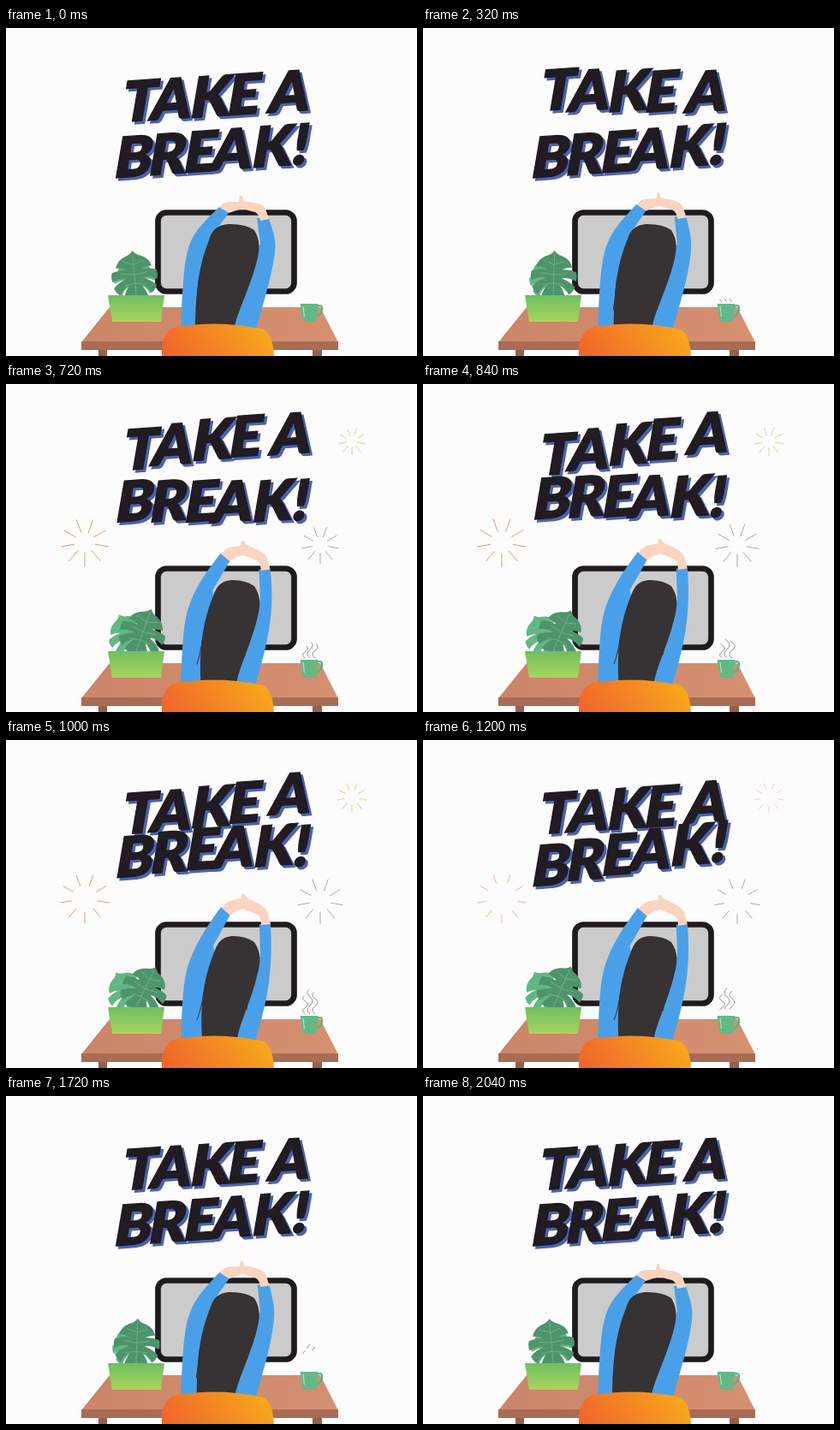
Recreate the animation shown at these times as an HTML page. Size 480 by 383 pixels, loop 2440 ms.

```html
<!DOCTYPE html>
<html lang="en">
<head>
<meta charset="utf-8">
<title>Take a break</title>
<style>
  html, body { margin: 0; width: 100%; height: 100%; overflow: hidden; background: #fcfcfc; }
  svg { display: block; width: 100%; height: 100%; }
  text { font: 900 66px Lato, Inter, sans-serif; text-anchor: middle; stroke-width: 1.4; }
  .shade { fill: #4b62b3; stroke: #4b62b3; }
  .face { fill: #211b22; stroke: #211b22; }
</style>
</head>
<body>
<svg viewBox="0 0 480 383">
  <defs>
    <linearGradient id="potFill" x2="0" y2="1">
      <stop stop-color="#70be62"/><stop offset="1" stop-color="#a8d55c"/>
    </linearGradient>
    <linearGradient id="chairFill" y1=".6" y2=".4">
      <stop stop-color="#f0672b"/><stop offset="1" stop-color="#f8a91a"/>
    </linearGradient>
    <linearGradient id="deskFill">
      <stop stop-color="#cb8568"/><stop offset="1" stop-color="#d59072"/>
    </linearGradient>
    <path id="halfLeaf" d="M0-52Q4-47 9-46Q19-42 21-33Q14-33 9-30Q18-31 26-28Q28-22 26-17Q17-22 9-20Q20-16 25-10Q23-4 18-1Q14-10 7-12Q12-6 14 2Q6 4-.3 0V-52Z"/>
    <g id="leaf">
      <use href="#halfLeaf"/>
      <use href="#halfLeaf" transform="scale(-1 1)"/>
      <path d="M0-48V2M0-36L12-40M0-36L-12-40M0-24L15-26M0-24L-15-26M0-14L13-12M0-14L-13-12" fill="none" stroke="#79b892" stroke-width=".7"/>
    </g>
  </defs>

  <g id="title"></g>
  <g id="bursts" fill="none" stroke-width=".95"></g>

  <rect x="177.5" y="215.5" width="159" height="92" rx="10" fill="#cbcbcc" stroke="#1f1b1d" stroke-width="6.700"/>

  <path d="M108 375h10v8h-10zM358 375h11v8h-11z" fill="#96604c"/>
  <path d="M121 326H367L388 367H88Z" fill="url(#deskFill)"/>
  <path d="M88 366H388V376H88Z" fill="#aa6b54"/>

  <use id="backLeaf" href="#leaf" fill="#61b782"/>
  <use id="frontLeaf" href="#leaf" fill="#4e946b"/>
  <path d="M119 312H185L181 343H124Z" fill="url(#potFill)"/>

  <g id="steam" fill="none" stroke="#939393" stroke-width="1"></g>
  <path d="M363 325Q370 322 369 329Q368 336 361 337" fill="none" stroke="#5cb184" stroke-width="2.4"/>
  <path d="M343.500 322H364.500L362 343H347Z" fill="#62b987"/>
  <path d="M347 325L348.500 337" stroke="#b4dfc5" stroke-width="1.200"/>

  <g id="woman"></g>
  <path d="M182 383C181 366 186 352 199 349Q247 341 298 351C308 354 312 366 313 383Z" fill="url(#chairFill)"/>
</svg>
<script>
const MOVE = 2040, LOOP = 2440, STEP = 40;
const byId = id => document.getElementById(id);
const clamp = v => Math.max(0, Math.min(1, v));

function add(parent, tag, attrs, text = '') {
  const node = document.createElementNS('http://www.w3.org/2000/svg', tag);
  for (const key in attrs) node.setAttribute(key, attrs[key]);
  node.textContent = text;
  return parent.appendChild(node);
}

// Blends two path strings that share the same commands.
function mixPath(from, to, p) {
  const ends = to.match(/[\d.]+/g);
  let i = 0;
  return from.replace(/[\d.]+/g, n => (+n + (ends[i++] - n) * p).toFixed(2));
}

// Relaxed and stretched pose of each body part.
const parts = [
  { fill: '#4aa0e8',
    rest: 'M249 209C234 224 220 236 214 254C208 272 206 300 204 356L262 356L238 246L260 216Z',
    reach: 'M251 195C237 214 224 234 216 254C207 275 206 300 204 356L262 356L242 240L262 204Z' },
  { fill: '#4aa0e8',
    rest: 'M293 222L307 222C311 236 316 246 314 262C309 300 297 330 291 356L250 356L270 300L297 252Z',
    reach: 'M296 215L309 215C310 230 310 246 309 262C307 300 297 330 290 356L250 356L272 300L297 252Z' },
  { fill: '#fbd4bf',
    rest: 'M249 209Q254 203 260 203L272 203L273 196Q276 194 277 202L290 204Q301 206 303 211L307 223L297 225Q296 218 291 215Q282 213 277 211Q268 213 260 216Z',
    reach: 'M252 196Q258 188 264 187L275 185L275 181Q278 177 281 184L293 190Q303 195 306 202L309 215L298 216Q298 208 294 204Q284 200 277 197Q268 199 262 205Z' },
  { fill: '#373233',
    rest: 'M262 229C245 229 240 238 237 248C224 280 222 310 221 347Q243 352 267 348C271 330 284 305 292 276C297 258 297 248 290 236Q280 229 262 229Z',
    reach: 'M266 229C251 229 247 238 243 248C230 280 227 310 229 347Q249 352 270 348C273 330 286 305 293 276C298 258 298 248 290 236Q280 229 266 229Z' },
  { fill: 'none', stroke: '#373233',
    rest: 'M286 290Q276 318 270 332',
    reach: 'M290 280Q282 300 281 315' },
  { fill: 'none', stroke: '#373233',
    rest: 'M225 295Q224 315 222 330',
    reach: 'M231 295Q228 315 223 327' },
];
for (const part of parts)
  part.node = add(byId('woman'), 'path', { fill: part.fill, stroke: part.stroke || 'none' });

// The wave runs through both lines; a space also takes a turn.
const lines = [
  { word: 'TAKE A', centers: [153, 190, 236, 275, 0, 328], base: x => 109 - .064 * (x - 150) },
  { word: 'BREAK!', centers: [146, 186, 224, 261, 308, 341], base: x => 174.5 - .074 * (x - 135) },
];
const letters = [];
lines.forEach(({ word, centers, base }, row) => {
  const group = add(byId('title'), 'g', {});
  const shades = add(group, 'g', { class: 'shade' });
  const faces = add(group, 'g', { class: 'face' });
  [...word].forEach((char, i) => {
    if (char === ' ') return;
    const x = centers[i];
    letters.push({
      x, y: base(x), peak: 480 + 64 * (row * 6 + i),
      shade: add(shades, 'text', {}, char), face: add(faces, 'text', {}, char),
    });
  });
});

const bursts = [
  { x: 92, y: 185, radius: 29, start: 330, fade: 1130, color: '#e8935c' },
  { x: 404, y: 67, radius: 17.5, start: 420, fade: 1130, color: '#f5c187' },
  { x: 367, y: 188, radius: 27, start: 480, fade: 1300, color: '#8fb3ac' },
];
for (const burst of bursts)
  burst.node = add(byId('bursts'), 'path', { stroke: burst.color });

const steam = [[349.5, 7.5], [355, 10], [361, 9]].map(([x, rise]) =>
  add(byId('steam'), 'path', {
    d: `M${x} 320q-6-${rise / 2} 0-${rise}t0-${rise}t0-${rise}`, pathLength: 1,
  }));

function drawLetters(t) {
  const wave = 1010, height = 17;
  for (const { x, y, peak, shade, face } of letters) {
    const gap = t - peak;
    const lift = Math.abs(gap) < wave / 2 ? Math.cos(Math.PI * gap / wave) ** 2 : 0;
    const place = (node, offset) => node.setAttribute('transform',
      `matrix(1 -.07 -.17 1 ${x + 2 * lift + offset} ${y - height * lift + offset})`);
    place(shade, 3);
    place(face, 0);
  }
}

function drawBurst({ x, y, radius, start, fade, node }, t) {
  const rays = 9, age = Math.max(0, t - start);
  const outer = radius * (1 - (1 - clamp(age / 550)) ** 3);
  const inner = Math.min(outer, radius * (.3 + .38 * (age / 920) ** 1.5));
  let d = '';
  for (let i = 0; i < rays; i++) {
    const angle = Math.PI / 2 + i * 2 * Math.PI / rays;
    const point = r => `${x + r * Math.cos(angle)} ${y + r * Math.sin(angle)}`;
    d += `M${point(inner)}L${point(outer)}`;
  }
  node.setAttribute('d', d);
  node.setAttribute('opacity', age ? 1 - clamp((t - fade) / 250) : 0);
}

function drawSteam(t) {
  const head = clamp((t - 200) / 850), tail = clamp((t - 1050) / 800);
  for (const line of steam) {
    line.setAttribute('stroke-dasharray', `0 ${tail} ${head - tail} 2`);
    line.setAttribute('visibility', head > tail ? 'visible' : 'hidden');
  }
}

function draw(t) {
  const stretch = Math.sin(Math.PI * t / MOVE) ** 2;
  for (const { node, rest, reach } of parts) node.setAttribute('d', mixPath(rest, reach, stretch));
  const turn = (id, angle, size) => byId(id).setAttribute('transform',
    `translate(152 312) rotate(${angle}) scale(${size})`);
  turn('backLeaf', -5 - 25 * stretch, .9);
  turn('frontLeaf', -5 + 31 * stretch, 1);
  drawLetters(t);
  for (const burst of bursts) drawBurst(burst, t);
  drawSteam(t);
}

const begin = performance.now();
function tick() {
  const t = (performance.now() - begin) % LOOP;
  draw(Math.min(MOVE, Math.floor(t / STEP) * STEP));
  requestAnimationFrame(tick);
}
tick();
</script>
</body>
</html>
```
